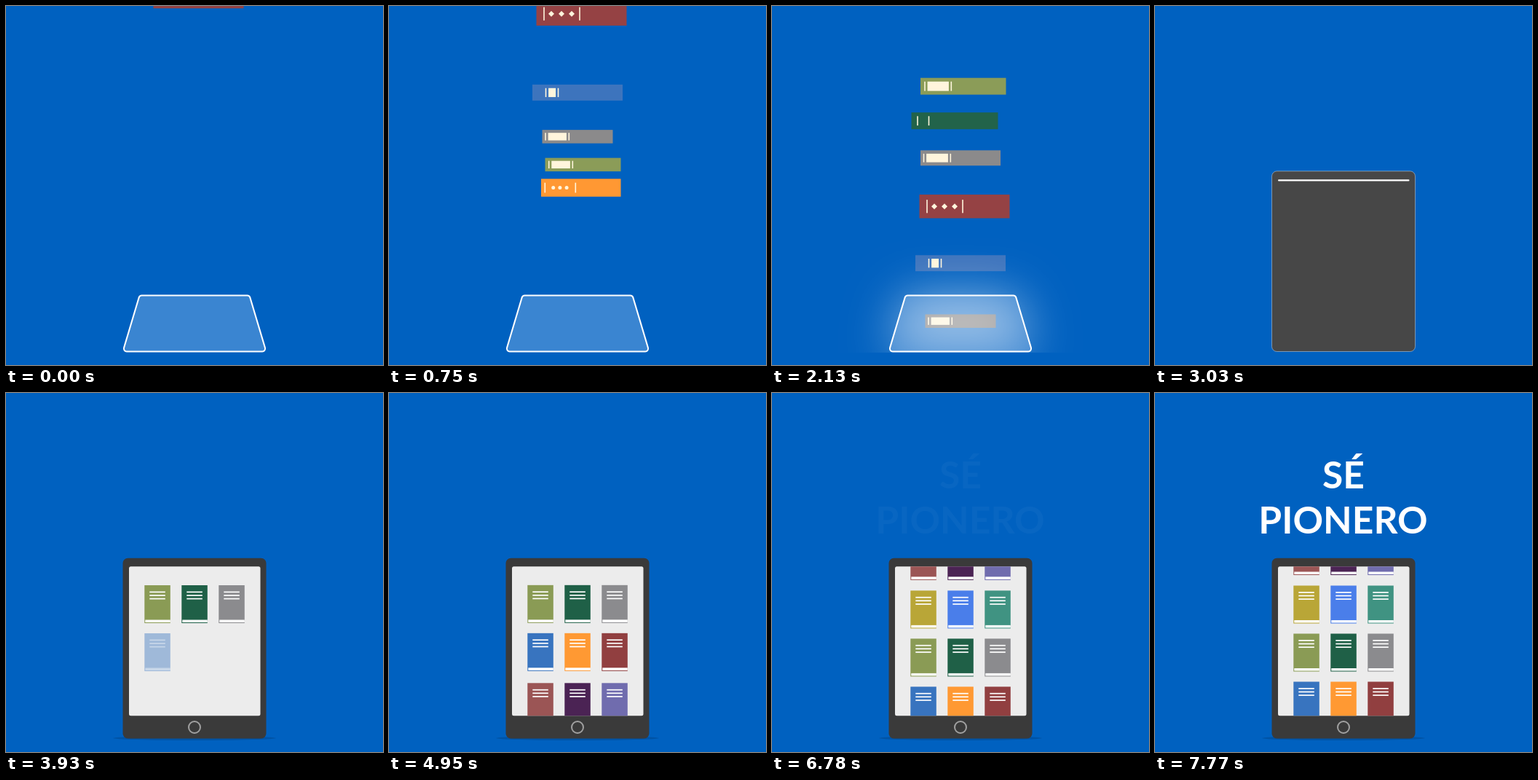
Recreate the animation shown at these times as an HTML page with a canvas. Size 518 by 493 pixels, loop 8000 ms.

```html
<!DOCTYPE html>
<html lang="es">
<head>
<meta charset="utf-8">
<title>Sé pionero</title>
<style>
  html, body { margin: 0; width: 100%; height: 100%; overflow: hidden; background: #0061c0; }
  canvas, svg { position: absolute; left: 0; top: 0; display: block; }
  text { font: 700 51.5px Lato, "Open Sans", sans-serif; fill: #fff; text-anchor: middle; }
</style>
</head>
<body>
<canvas id="stage" width="518" height="493"></canvas>
<svg width="518" height="493">
  <g id="title" opacity="0">
    <text x="259" y="131">SÉ</text>
    <text x="258.5" y="193">PIONERO</text>
  </g>
</svg>
<script>
const LOOP = 8000;
const BG = '#0061c0', CREAM = '#fff5dc';
const ctx = document.getElementById('stage').getContext('2d');
const title = document.getElementById('title');

const clamp = v => Math.max(0, Math.min(1, v));
const span = (t, from, to) => clamp((t - from) / (to - from));
const mix = (a, b, u) => a + (b - a) * u;
const inOut = u => u < .5 ? 4 * u ** 3 : 1 - 4 * (1 - u) ** 3;
const mixRgb = (a, b, u) => `rgb(${a.map((v, i) => Math.round(mix(v, b[i], u)))})`;

function box(x, y, w, h, fill) {
  ctx.fillStyle = fill;
  ctx.fillRect(x, y, w, h);
}

// Falling books, bottom first: x, width, height, resting centre, two spine bars, colour, mark
const pile = [
  [209, 109.5, 24.5, 308, 214.3, 256.3, '#ff9833', 'dots'],
  [214.5, 104, 18.5, 284.5, 219.7, 252.3, '#8b9c58', 'label'],
  [210.5, 97, 18.5, 265, 215, 247.3, '#8b8a8b', 'label'],
  [197, 124, 22, 244, 215.5, 232.5, '#3d74bd', 'label'],
  [202.5, 124, 32.5, 212, 213, 262, '#954244', 'gems'],
  [204, 110, 21, 179, 208.5, 245.3, '#8b8a8b', 'label'],
  [191.5, 119, 23, 149, 200, 215.5, '#22634a', 'none'],
  [204, 117.5, 23, 110, 210, 246.3, '#8b9c58', 'label']
];

// Decelerate into the pile, then accelerate down into the tablet
function fallY(t, i, rest) {
  const last = i === 7;
  const start = last ? 1100 : 210 + 130 * i;
  const time = last ? 1030 : 600 + 960 * (1 - i / 6) ** 1.6;
  const u = span(t, start, start + time);
  const arrive = last ? u ** .78 : 1 - (1 - u) ** 4;
  const drop = Math.max(0, t - 1772 - 50 * i);
  return mix(-13, rest, arrive) + .0025 * drop * drop;
}

function drawSpine([x, w, h, rest, b1, b2, color, mark], i, t) {
  const y = fallY(t, i, rest);
  ctx.globalAlpha = 1 - span(y, 434, 458);
  if (y + h / 2 <= 0 || ctx.globalAlpha === 0) return;
  box(x, y - h / 2, w, h, color);
  const bar = h * .56;
  for (const b of [b1, b2]) box(b - .8, y - bar / 2, 1.6, bar, CREAM);
  if (mark === 'label') box(b1 + 3.6, y - bar / 2, b2 - b1 - 7, bar, CREAM);
  if (mark === 'dots' || mark === 'gems') {
    const gem = mark === 'gems';
    ctx.beginPath();
    for (let k = 0; k < 3; k++) {
      const cx = gem ? 223 + 14 * k : 225.7 + 9.2 * k;
      if (gem) {
        ctx.moveTo(cx, y - 4);
        ctx.lineTo(cx + 4, y);
        ctx.lineTo(cx, y + 4);
        ctx.lineTo(cx - 4, y);
      } else {
        ctx.moveTo(cx + 2.5, y);
        ctx.arc(cx, y, 2.5, 0, 7);
      }
    }
    ctx.fillStyle = CREAM;
    ctx.fill();
  }
}

// Tablet body: 0 lying flat, 1 standing
function bodyPath(stand, dx = 0) {
  const top = mix(397.5, 226.8, stand), half = mix(75.5, 98.5, stand);
  const pts = [[259 + half, top], [357.5, 474.5], [160.5, 474.5], [259 - half, top]];
  const r = mix(4, 7, stand);
  ctx.beginPath();
  ctx.moveTo(259 + dx, top);
  pts.forEach(([x, y], i) => {
    const [nx, ny] = i < 3 ? pts[i + 1] : [259, top];
    ctx.arcTo(x + dx, y, nx + dx, ny, r);
  });
  ctx.closePath();
}

function drawBody(t) {
  const stand = inOut(span(t, 2700, 3010));
  const settle = span(t, 3000, 3400);
  const shadow = span(t, 3050, 3450);
  if (shadow) {
    ctx.globalAlpha = shadow;
    ctx.fillStyle = '#0053a5';
    ctx.beginPath();
    ctx.ellipse(259, 474, 112, 3, 0, 0, 7);
    ctx.fill();
    ctx.globalAlpha = 1;
  }
  bodyPath(stand);
  const dark = mix(72, 58, settle);
  ctx.fillStyle = mixRgb([58, 133, 209], [dark, dark, dark], span(t, 2700, 2980));
  ctx.fill();
  return stand;
}

function drawRim(t, stand) {
  const alpha = mix(1, .5, span(t, 2700, 3010)) * (1 - span(t, 3030, 3400));
  if (!alpha) return;
  bodyPath(stand);
  ctx.globalAlpha = alpha;
  ctx.strokeStyle = '#fff';
  ctx.lineWidth = mix(2, .8, stand);
  ctx.stroke();
  ctx.globalAlpha = 1;
}

function drawGlow(t, stand) {
  const g = span(t, 1830, 2130) * (1 - span(t, 2700, 3000));
  if (!g) return;
  ctx.save();
  ctx.beginPath();
  ctx.rect(0, 0, 518, 476);
  ctx.clip();
  ctx.shadowColor = `rgba(255,255,255,${.52 * g})`;
  ctx.shadowBlur = 66;
  ctx.shadowOffsetX = 2000;
  ctx.fillStyle = '#fff';
  bodyPath(stand, -2000);
  ctx.fill();
  ctx.restore();
}

const covers = [
  '#8a9b55', '#1f6047', '#8b8b8e', '#3874bf', '#ff9933', '#913f40',
  '#9b5555', '#4b2354', '#706cae', '#b9a637', '#4a7eea', '#409382'
];
const rowTops = [264, 330, 398.5, 465];
const PERIOD = 267;

function drawCover(x, y, color) {
  box(x, y, 35.5, 52, color);
  box(x + 1, y + 47.5, 34.5, 3.5, '#fff');
  for (let k = 0; k < 3; k++) box(x + 7, y + 8.5 + 4.6 * k, 21.5, 1.7, '#fff');
}

function drawScreen(t) {
  const h = 205 * inOut(span(t, 2958, 3480));
  if (!h) return;
  ctx.save();
  ctx.beginPath();
  ctx.roundRect(169, 238.3, 180.5, h, Math.min(2.5, h / 2));
  ctx.fillStyle = mixRgb([255, 255, 255], [236, 236, 236], span(t, 3030, 3480));
  ctx.fill();
  ctx.clip();
  const scroll = 200.5 * inOut(span(t, 4800, 7290));
  for (let i = 0; i < 18; i++) {
    const row = Math.floor(i / 3);
    const y = rowTops[row % 4] + PERIOD * Math.floor(row / 4) - scroll;
    if (y > 444 || y < 180) continue;
    ctx.globalAlpha = i < 9 ? span(t, 3490 + 130 * i, 3610 + 130 * i) : 1;
    if (ctx.globalAlpha) drawCover(190.3 + 51 * (i % 3), y, covers[i % 12]);
  }
  ctx.restore();
}

function drawButton(t) {
  const a = span(t, 3500, 3750);
  if (!a) return;
  ctx.globalAlpha = a;
  ctx.strokeStyle = '#a0a0a0';
  ctx.lineWidth = 2;
  ctx.beginPath();
  ctx.arc(259, 459, 8, 0, 7);
  ctx.stroke();
  ctx.globalAlpha = 1;
}

function draw(t) {
  box(0, 0, 518, 493, BG);
  const stand = drawBody(t);
  if (t < 2700) pile.forEach((book, i) => drawSpine(book, i, t));
  ctx.globalAlpha = 1;
  drawGlow(t, stand);
  drawRim(t, stand);
  drawScreen(t);
  drawButton(t);
  title.setAttribute('opacity', span(t, 6750, 7750));
}

const began = performance.now();
function tick() {
  draw((performance.now() - began) % LOOP);
  requestAnimationFrame(tick);
}
tick();
</script>
</body>
</html>
```
